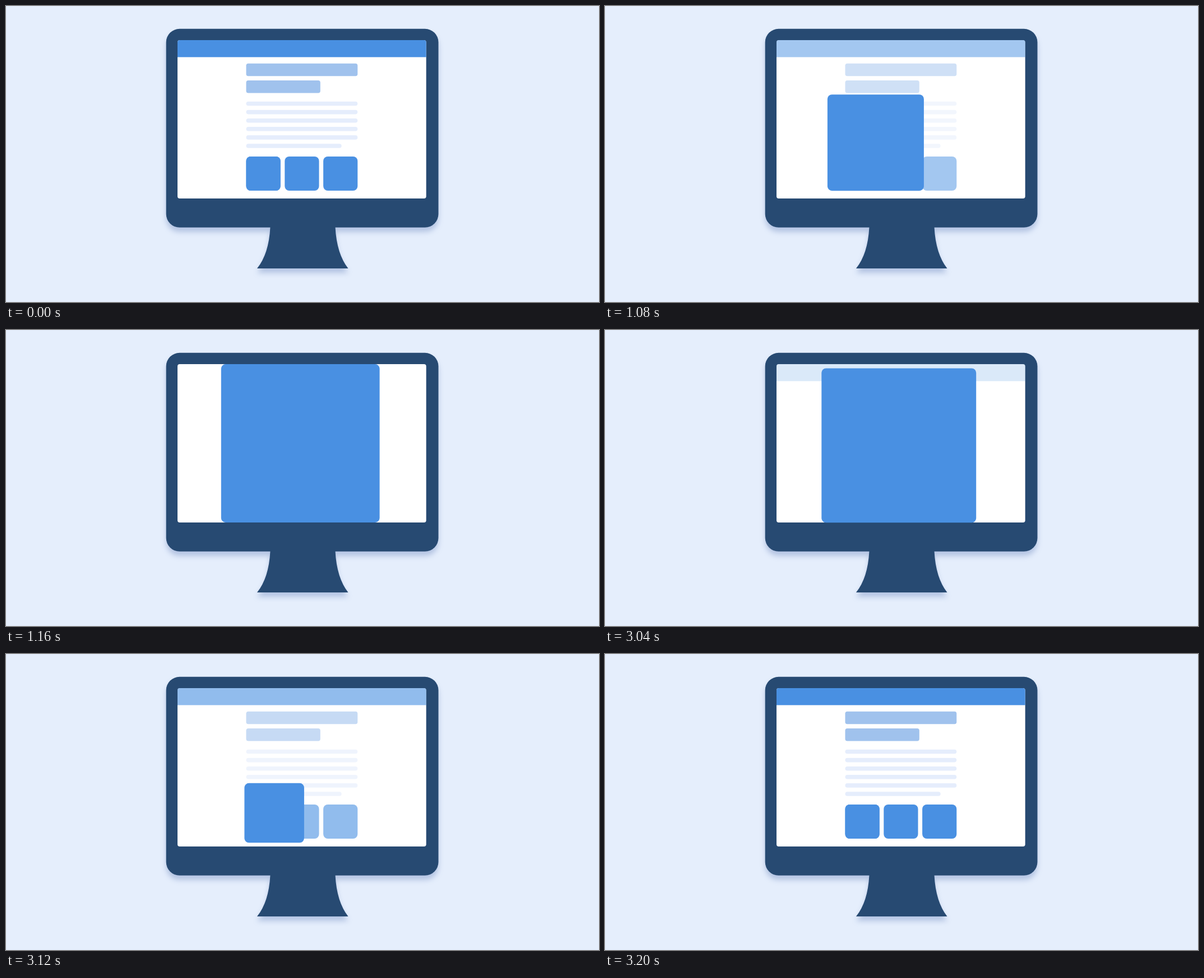
These frames come from a looping animation (1058 px wide and 529 px high, 4.04 s). An HTML page:

```html
<!DOCTYPE html>
<html lang="en">
<head>
<meta charset="utf-8">
<title>Expanding tile</title>
<style>
  html, body { margin: 0; width: 100%; height: 100%; overflow: hidden; background: #e5eefc; }
  svg { display: block; width: 100%; height: 100%; }
  #monitor { fill: #274a72; filter: drop-shadow(0 8px 5px rgba(66, 100, 170, .3)); }
  .blue { fill: #4990e2; }
  .heading { fill: #a0c2ed; }
  .line { fill: #e5edfc; }
</style>
</head>
<body>
<svg viewBox="0 0 1058 529">
  <clipPath id="screen"><rect x="306" y="61" width="443.7" height="283" rx="4"/></clipPath>
  <g id="monitor">
    <rect x="285.7" y="40.8" width="485.8" height="355" rx="24"/>
    <path d="M471.5 395Q469 443 448 469H610.5Q590 443 587.5 395Z"/>
  </g>
  <g clip-path="url(#screen)">
    <rect x="306" y="61" width="444" height="283" fill="#fff"/>
    <g id="page"></g>
  </g>
  <rect id="tile" class="blue" rx="8"/>
</svg>
<script>
  const LOOP = 4040, STEP = 40;
  const SMALL = { cx: 459.1, cy: 299.5, size: 61.2 };
  const LARGE = { cx: 525.2, cy: 202.5, size: 282.8 };
  const page = document.getElementById('page');
  const tile = document.getElementById('tile');

  function setAttributes(node, attributes) {
    for (const name in attributes) node.setAttribute(name, attributes[name]);
  }

  function addRect(className, x, y, width, height, rx) {
    const rect = document.createElementNS('http://www.w3.org/2000/svg', 'rect');
    setAttributes(rect, { class: className, x, y, width, height, rx });
    page.append(rect);
  }

  addRect('blue', 306, 61, 444, 30.4, 0);
  addRect('heading', 428.5, 102.8, 198.8, 22.5, 3.8);
  addRect('heading', 428.5, 133, 132.3, 22.5, 3.8);
  for (let i = 0; i < 6; i++) addRect('line', 428.5, 170.7 + i * 15.1, i < 5 ? 198.8 : 170.2, 7.6, 3.8);
  for (let i = 0; i < 3; i++) addRect('blue', 428.5 + i * 68.8, 268.9, 61.2, 61.2, 8);

  // Symmetric cubic-bezier(.755, 0, .245, 1), solved by bisection.
  function ease(t) {
    let low = 0, high = 1, s = 0.5;
    for (let i = 0; i < 24; i++) {
      s = (low + high) / 2;
      const x = 3 * s * (1 - s) * (0.755 * (1 - s) + 0.245 * s) + s ** 3;
      if (x < t) low = s; else high = s;
    }
    return s * s * (3 - 2 * s);
  }

  const clamp = v => Math.min(1, Math.max(0, v));
  const mix = (a, b, p) => a + (b - a) * p;

  function moveTile(from, to, t) {
    const p = t <= 0 ? 0 : t >= 1 ? 1 : ease(t);
    const bend = p * (1 - p); // vertical motion leads, horizontal lags
    const size = mix(from.size, to.size, p);
    setAttributes(tile, {
      x: mix(from.cx, to.cx, p - 0.56 * bend) - size / 2,
      y: mix(from.cy, to.cy, p + 0.28 * bend) - size / 2,
      width: size,
      height: size
    });
  }

  function draw(now) {
    const time = Math.floor((now % LOOP) / STEP) * STEP;
    const open = clamp((time - 1000) / 160);
    const close = clamp((time - 3000) / 200);
    if (close > 0) moveTile(LARGE, SMALL, close);
    else moveTile(SMALL, LARGE, open);
    page.setAttribute('opacity', 1 - open + close);
  }

  function tick() {
    draw(performance.now());
    requestAnimationFrame(tick);
  }
  tick();
</script>
</body>
</html>
```
